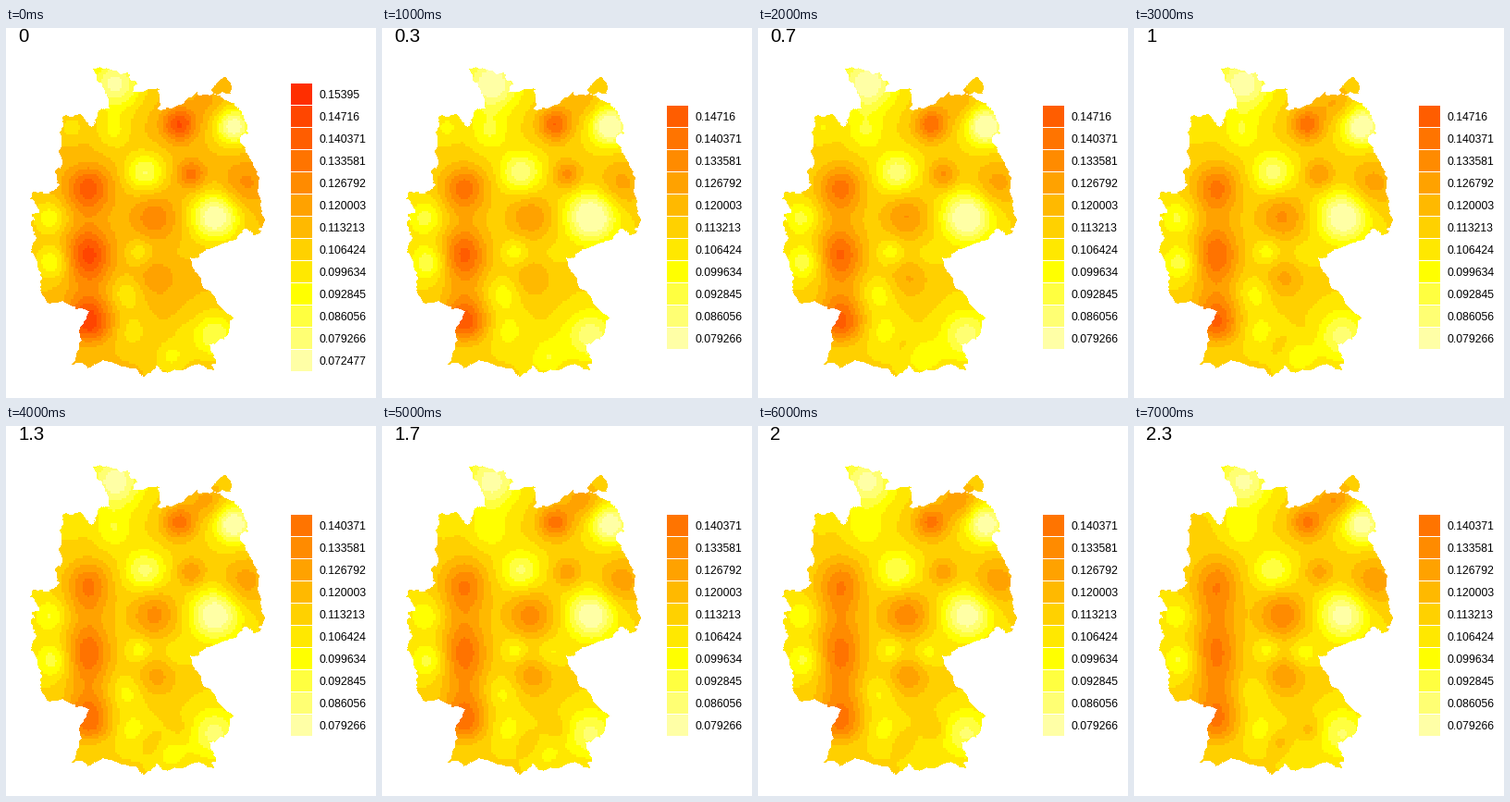
A matplotlib script that plays this animation: 400 px wide and 400 px high, repeating every 8000 ms.

```python
import numpy as np
import matplotlib.pyplot as plt
from matplotlib.animation import ArtistAnimation
from matplotlib.patches import Rectangle
from matplotlib.path import Path

SIZE, DPI, FRAMES = 400, 100, 8
LOWEST, STEP = 0.0724769, 0.00678939
CELL = 2.5      # map tile in pixels
BASE = 5.6      # typical level
FONT = "Liberation Sans"

# Key points of the border, clockwise from the north-west
BORDER = [
    (94, 44), (104, 44), (130, 48), (141, 58), (138, 69), (167, 67), (164, 87),
    (180, 86), (207, 69), (222, 72), (241, 79), (256, 91), (261, 113),
    (253, 124), (268, 150), (272, 177), (280, 207), (275, 222), (259, 217),
    (248, 229), (209, 244), (199, 249), (213, 281), (246, 314), (239, 333),
    (220, 342), (226, 357), (224, 371), (209, 362), (175, 372), (162, 365),
    (149, 378), (138, 368), (105, 359), (88, 366), (71, 364), (79, 328),
    (91, 306), (64, 297), (47, 298), (37, 281), (40, 270), (27, 242),
    (33, 228), (27, 211), (36, 198), (28, 179), (45, 179), (58, 168),
    (52, 155), (61, 148), (58, 112), (61, 96), (80, 93), (95, 106), (104, 87),
    (113, 88), (104, 62)]
ISLAND = [(222, 66), (238, 53), (243, 70), (231, 73)]

# Warm and cool spots: x, y, radius, height at the start, height at the end
SPOTS = [
    (187, 104, 13, 5, 4.2), (217, 80, 14, 1.2, 3), (200, 158, 11, 3.4, 2.4),
    (258, 168, 18, 2.2, 2.7), (160, 204, 18, 2.6, 3.8),
    (162, 270, 16, 1.7, 2.8), (157, 342, 9, 0.3, 1.6), (190, 328, 9, -0.6, 1.6),
    (118, 60, 20, -5.5, -4.5), (116, 112, 14, -2.2, -1.8),
    (150, 156, 15, -4.2, -3), (246, 106, 14, -6, -5.4),
    (226, 204, 18, -6.5, -5), (144, 242, 10, -2, -2), (182, 245, 11, -0.3, -2),
    (130, 288, 13, -2, -1.4), (136, 328, 14, -1.6, -1.6),
    (225, 332, 18, -4, -3.2), (178, 355, 14, -2.3, -0.8),
    (70, 108, 10, -1.6, 0), (47, 205, 13, -2.8, -1.8), (50, 253, 13, -3.2, -2.4)]


def ragged(points, rng, rough=2.2):
    """Closed path whose edges are broken up by midpoint displacement."""
    pts = np.array(points, float)
    for _ in range(4):
        mids = (pts + np.roll(pts, -1, axis=0)) / 2
        mids += rng.normal(0, rough, mids.shape)
        pts = np.stack([pts, mids], axis=1).reshape(-1, 2)
        rough *= 0.6
    return Path(np.vstack([pts, pts[:1]]))


def land_mask():
    rng = np.random.default_rng(4)
    x, y = np.meshgrid(np.arange(SIZE) + 0.5, np.arange(SIZE) + 0.5)
    pix = np.column_stack([x.ravel(), y.ravel()])
    mask = np.zeros(len(pix), bool)
    for shape in (BORDER, ISLAND):
        mask |= ragged(shape, rng).contains_points(pix)
    return mask.reshape(SIZE, SIZE)


def lerp(a, b, t):
    return a + (b - a) * t


def ridge(x, y, t):
    """Warm western band whose three peaks melt into one strip."""
    wave = np.cos(2 * np.pi * (y - 171) / 73.5)
    height = 3.8 + lerp(1.6, 0.5, t) * wave + lerp(0.008, 0.002, t) * (y - 245)
    ends = 1 / (1 + np.exp((145 - y) / 9)) / (1 + np.exp((y - 338) / 6))
    return height * ends * np.exp(-((x - 89) / 17) ** 2 / 2)


def field(t):
    """Level of every pixel, constant within a tile."""
    axis = (np.arange(SIZE) // CELL + 0.5) * CELL
    x, y = np.meshgrid(axis, axis)
    level = BASE + ridge(x, y, t)
    for cx, cy, radius, start, end in SPOTS:
        d2 = ((x - cx) ** 2 + (y - cy) ** 2) / radius ** 2
        level += lerp(start, end, t) * np.exp(-d2 / 2)
    return np.rint(level).astype(int)


def heat_colors():
    """Sixteen colours from red through yellow to pale yellow."""
    warm = [(1, g, 0) for g in np.linspace(0, 1, 12)]
    pale = [(1, 1, b) for b in np.linspace(0.25, 0.85, 4)]
    return np.array(warm + pale)


HEAT = heat_colors()
LAND = land_mask()

fig = plt.figure(figsize=(SIZE / DPI, SIZE / DPI), dpi=DPI, facecolor="white")
ax = fig.add_axes([0, 0, 1, 1])
ax.axis("off")


def label(x, y, text, px):
    return ax.text(x, y, text, family=FONT, size=px * 72 / DPI,
                   color="black", va="baseline")


def legend(low, high, shift):
    parts = []
    for row, level in enumerate(range(high, low - 1, -1)):
        y = 215 + 24 * (row - (high - low) / 2)
        parts.append(ax.add_patch(Rectangle(
            (308, y - 11.5), 23, 23, facecolor=HEAT[shift - level],
            edgecolor="none")))
        value = f"{LOWEST + level * STEP:.6f}".rstrip("0")
        parts.append(label(338.4, y + 4.5, value, 12.2))
    return parts


def scene(i):
    low, high = (0, 12) if i == 0 else (1, 11) if i < 4 else (1, 10)
    shift = 14 if i == 0 else 15
    rgb = HEAT[shift - np.clip(field(i / (FRAMES - 1)), low, high)]
    rgb[~LAND] = 1
    picture = ax.imshow(rgb, extent=(0, SIZE, SIZE, 0),
                        interpolation="nearest", zorder=0)
    title = label(13.2, 14.6, f"{round(i / 3, 1):g}", 20.3)
    return [picture, title] + legend(low, high, shift)


scenes = [scene(i) for i in range(FRAMES)]
ax.set(xlim=(0, SIZE), ylim=(SIZE, 0))
anim = ArtistAnimation(fig, scenes, interval=1000, repeat=True, repeat_delay=0)
plt.show()
```
